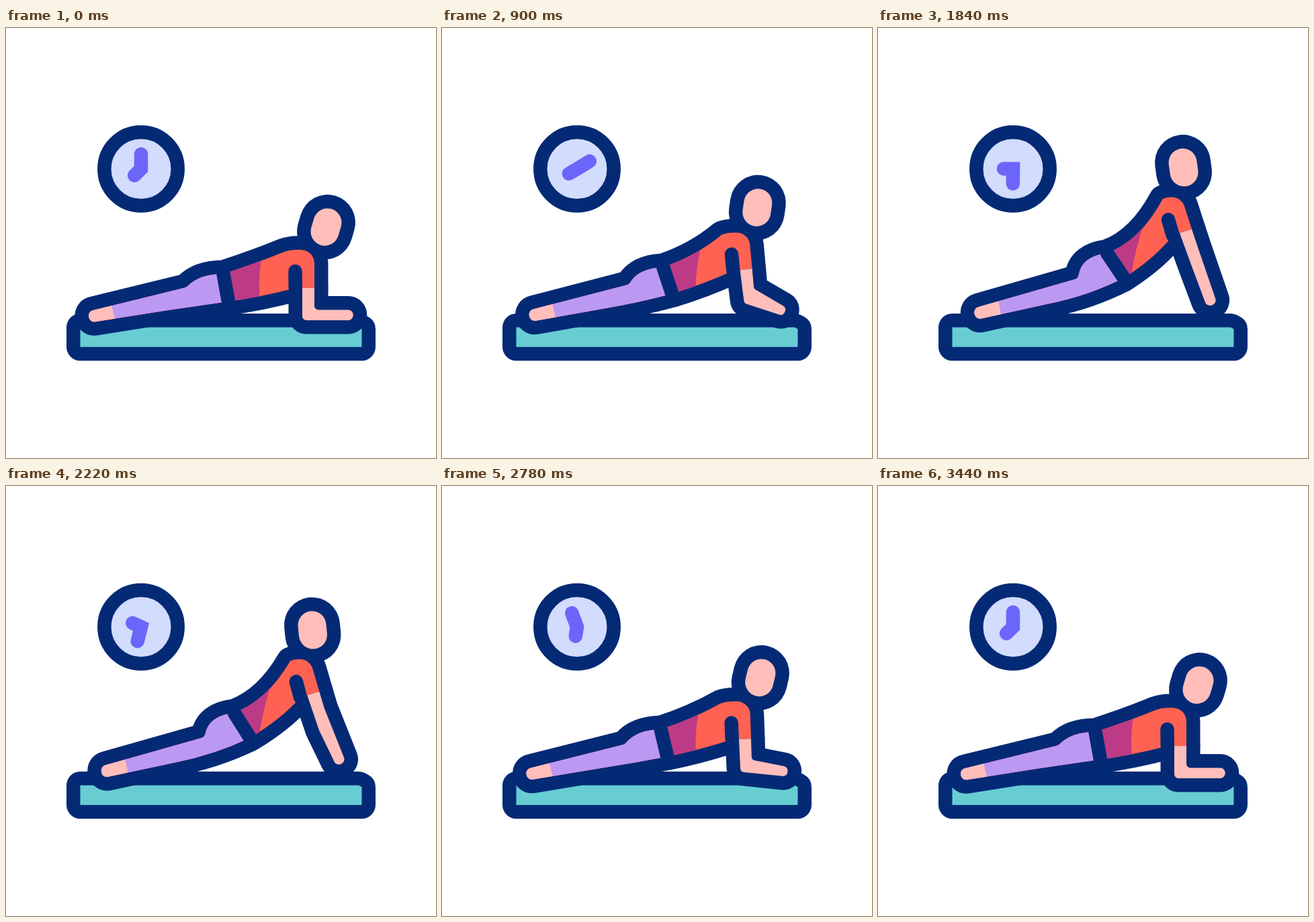
An HTML page with a canvas that plays this animation: 640x640 px, repeating every 3600 ms.

```html
<!DOCTYPE html>
<html lang="en">
<head>
<meta charset="utf-8">
<title>Plank stretch</title>
<style>
  html, body { margin: 0; width: 100%; height: 100%; overflow: hidden; background: #fff; }
  canvas { display: block; width: 640px; height: 640px; }
</style>
</head>
<body>
<canvas id="stage" width="640" height="640"></canvas>
<script>
const ctx = document.getElementById('stage').getContext('2d');
const LOOP = 3600, HALF = 1720, STEP = 20, LINE = 20.5;
const DARK = '#042a75', TEAL = '#67cdd3', LILAC = '#bb99f2', PLUM = '#bd3b86',
      CORAL = '#ff6252', SKIN = '#ffbeb9', DIAL = '#d2dcfd', HAND = '#6b66f9';

// Key points of the figure: x, y lying low, then x, y pushed up.
const joints = {
  toeTop:   [122, 422, 142, 417.3],
  toeLow:   [124.5, 438.5, 145.5, 434.3],
  seat:     [268.5, 386, 298, 372.6],
  hip:      [288, 366, 303, 340],
  beltTop:  [323.5, 366, 341, 335],
  beltLow:  [331, 407, 366, 372],
  thigh:    [283, 414, 312, 399],
  sole:     [235, 421, 256, 410],
  back:     [373, 350, 390, 317],
  nape:     [413, 333.5, 424, 254],
  neck:     [424, 329.5, 430, 251],
  shoulder: [459, 331, 452, 252.5],
  armpit:   [430.5, 362, 432, 285],
  belly:    [377, 401, 414, 341],
  seamLow:  [379, 398, 379, 364],
  cuffOut:  [459, 387, 467, 299],
  cuffIn:   [441, 387, 449, 305],
  elbowIn:  [459, 419.5, 475, 323],
  elbowOut: [441, 435, 468, 357],
  handTop:  [516.8, 419.5, 504.7, 410],
  handLow:  [516.8, 435, 489.5, 415],
  crown:    [478.5, 289.5, 453.5, 200],
  chin:     [474.5, 303, 455.5, 214.5]
};

const mix = (a, b, k) => a + (b - a) * k;
const between = (p, q, k) => [mix(p[0], q[0], k), mix(p[1], q[1], k)];
const onCurve = (p, c, q, k) => between(between(p, c, k), between(c, q, k), k);
const tipRadius = (p, q) => 0.48 * Math.hypot(p[0] - q[0], p[1] - q[1]);

// Cubic easing with handles (x1, 0) and (x2, 1).
function ease(x, x1, x2) {
  let lo = 0, hi = 1;
  for (let i = 0; i < 30; i++) {
    const s = (lo + hi) / 2, r = 1 - s;
    if (3 * x1 * s * r * r + 3 * x2 * s * s * r + s * s * s < x) lo = s; else hi = s;
  }
  return lo * lo * (3 - 2 * lo);
}

function poseAt(k) {
  const j = {};
  for (const name in joints) {
    const [x0, y0, x1, y1] = joints[name];
    j[name] = [mix(x0, x1, k), mix(y0, y1, k)];
  }
  j.chest = between(j.cuffOut, j.cuffIn, 1.57);
  j.seamTop = onCurve(j.beltTop, j.back, j.nape, 0.62);
  j.ankleTop = between(j.toeTop, j.seat, 0.24);
  j.ankleLow = between(j.toeLow, j.sole, 0.34);
  return j;
}

function bodyPath(j) {
  const path = new Path2D(), toe = tipRadius(j.toeTop, j.toeLow);
  path.moveTo(...between(j.toeTop, j.toeLow, 0.5));
  path.arcTo(...j.toeTop, ...j.seat, toe);
  path.arcTo(...j.seat, ...j.hip, 8);
  path.quadraticCurveTo(...j.hip, ...j.beltTop);
  path.quadraticCurveTo(...j.back, ...j.nape);
  path.quadraticCurveTo(...j.neck, ...between(j.neck, j.shoulder, 0.4));
  path.arcTo(...j.shoulder, ...j.cuffOut, 20);
  for (const p of [j.cuffOut, j.cuffIn, j.armpit, j.chest]) path.lineTo(...p);
  path.quadraticCurveTo(...j.belly, ...j.beltLow);
  path.quadraticCurveTo(...j.thigh, ...j.sole);
  path.arcTo(...j.toeLow, ...j.toeTop, toe);
  path.closePath();
  return path;
}

function armPath(j) {
  const path = new Path2D(), tip = tipRadius(j.handTop, j.handLow);
  path.moveTo(...j.cuffOut);
  path.arcTo(...j.elbowIn, ...j.handTop, 6);
  path.arcTo(...j.handTop, ...j.handLow, tip);
  path.arcTo(...j.handLow, ...j.elbowOut, tip);
  path.arcTo(...j.elbowOut, ...j.cuffIn, 6);
  path.lineTo(...j.cuffIn);
  path.closePath();
  return path;
}

function linePath(...points) {
  const path = new Path2D();
  for (const p of points) path.lineTo(...p);
  return path;
}

// Everything to the left of a seam that may bow to the left.
function leftOf(top, low, bow = 0) {
  const [mx, my] = between(top, low, 0.5), path = new Path2D();
  path.moveTo(...between(low, top, 1.2));
  path.quadraticCurveTo(mx - bow, my, ...between(top, low, 1.2));
  path.lineTo(0, 640);
  path.lineTo(0, 0);
  return path;
}

function fill(path, color) {
  ctx.fillStyle = color;
  ctx.fill(path);
}

function stroke(path, color, width, join = 'round') {
  ctx.strokeStyle = color;
  ctx.lineWidth = width;
  ctx.lineJoin = join;
  ctx.lineCap = 'round';
  ctx.stroke(path);
}

function drawMat() {
  const mat = new Path2D('M110.5 445.5H525L529.5 448V474.7H110.5Z');
  stroke(mat, DARK, LINE * 2);
  fill(mat, TEAL);
}

function drawClock(minute, hour) {
  const x = 201, y = 209.7, face = new Path2D();
  const tip = (deg, r) => {
    const a = deg * Math.PI / 180;
    return [x + r * Math.sin(a), y - r * Math.cos(a)];
  };
  face.arc(x, y, 54.7, 0, Math.PI * 2);
  fill(face, DIAL);
  stroke(face, DARK, LINE);
  stroke(linePath(tip(minute, 22), [x, y], tip(hour, 14)), HAND, LINE, 'miter');
}

function drawPerson(k) {
  const j = poseAt(k), body = bodyPath(j), arm = armPath(j), head = linePath(j.crown, j.chin);
  stroke(body, DARK, LINE * 2);
  stroke(arm, DARK, LINE * 2);
  stroke(head, DARK, 42 + LINE * 2);

  fill(body, CORAL);
  ctx.save();
  ctx.clip(body);
  fill(leftOf(j.seamTop, j.seamLow, 6), PLUM);
  fill(leftOf(j.beltTop, j.beltLow), LILAC);
  fill(leftOf(j.ankleTop, j.ankleLow), SKIN);
  ctx.restore();

  fill(arm, SKIN);
  stroke(head, SKIN, 42);
  stroke(linePath(j.beltTop, j.beltLow), DARK, LINE);
  stroke(linePath(j.armpit, j.chest), DARK, LINE);
}

function draw(time) {
  const t = Math.floor(time % LOOP / STEP) * STEP;
  ctx.fillStyle = '#fff';
  ctx.fillRect(0, 0, 640, 640);
  drawMat();
  if (t <= HALF) {
    const k = ease(t / HALF, 0.96, 0.175);
    drawClock(180 * k, 225 + 45 * k);
    drawPerson(k);
  } else {
    const x = Math.min(1, t / HALF - 1), k = ease(x, 0.79, 0.103);
    drawClock(180 + 180 * k, 270 + 315 * k);
    drawPerson(1 - ease(x, 0.776, 0.131));
  }
}

const start = performance.now();
function tick() {
  draw(performance.now() - start);
  requestAnimationFrame(tick);
}
tick();
</script>
</body>
</html>
```
